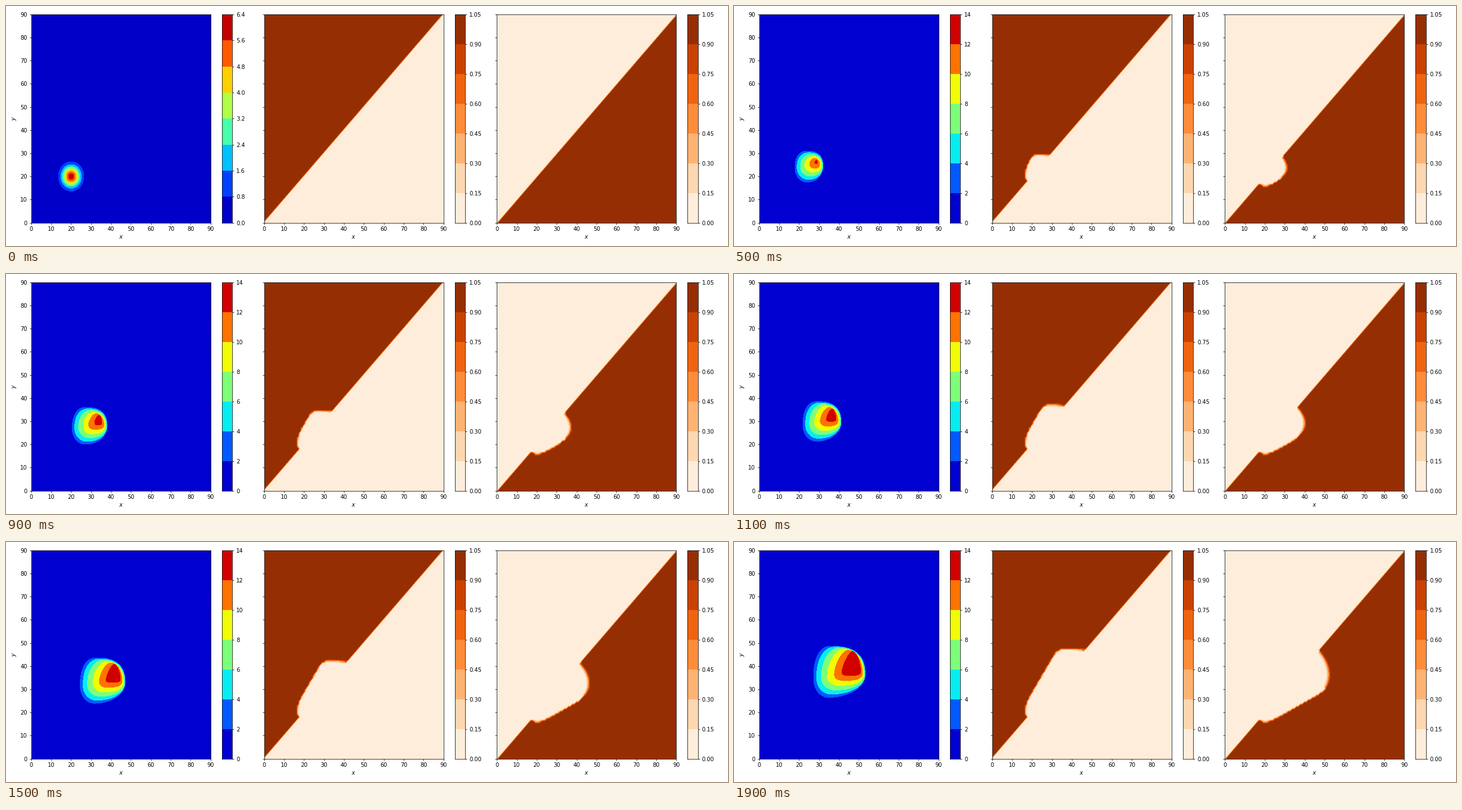
These frames come from a looping animation (1280x427 px, 2 s). A matplotlib script:

```python
import numpy as np
import matplotlib.pyplot as plt
from matplotlib.animation import FuncAnimation
from matplotlib.patches import Polygon

W, H, DPI = 1280, 427, 64
K = 10 / 9  # enlarges the default point sizes for this dpi
plt.rcParams.update({
    "font.family": "DejaVu Sans", "font.size": 10 * K,
    "axes.linewidth": 0.8 * K, "axes.labelpad": 4 * K,
    "xtick.major.size": 3.5 * K, "ytick.major.size": 3.5 * K,
    "xtick.major.width": 0.8 * K, "ytick.major.width": 0.8 * K,
    "xtick.major.pad": 3.5 * K, "ytick.major.pad": 3.5 * K,
})

LEFT, STEP_X, AX_W = 44.8, 412.75, 318
BASE, AX_H = 41.5, 370.5
FRAMES = 20
GROWN = 5  # frame from which the colony only travels and spreads

# Left, top, right and bottom tips (stage pixels) of the colony's rim and
# core when grown, and how far each tip travels per frame.
RIM = np.array([[108, 288], [130, 258], [157.7, 285], [130, 313.5]])
RIM_SPEED = np.array([[2.36, -3.2], [3.07, -5.2], [5.34, -3.5], [2.64, -2.64]])
CORE = np.array([[143.5, 277.5], [146, 274.5], [148, 278.5], [146, 281]])
CORE_SPEED = np.array([[3.4, -3.2], [4.57, -5.7], [5.46, -3.5], [4.14, -3.1]])
NESTING = np.array([[1.4], [1.1], [2.2], [1.2]])
# Quadrant exponents: 1 is an ellipse arc, 2 a straight cut.
RIM_ROUND = np.array([0.85, 0.8, 1, 1])
CORE_ROUND = np.array([1.4, 1.15, 0.65, 0.85])
TIPS = np.array([[-1, 0], [0, -1], [1, 0], [0, 1]])


def mix(a, b, k):
    return a + (b - a) * k


def contour(share, t):
    """Closed curve where density is the given share of its peak."""
    depth = np.clip((share - 0.16) / 0.82, 0, 1)
    age = max(t - GROWN, 0)
    tips = mix(RIM + RIM_SPEED * age, CORE + CORE_SPEED * age, depth ** NESTING)
    power = mix(RIM_ROUND, CORE_ROUND, depth ** 1.5)

    # The colony starts as a Gaussian and reshapes until grown.
    radius = np.sqrt(-20 * np.log(share)) / 90
    seed = [115.5, 303.2] + TIPS * radius * [AX_W, AX_H]
    growth = min(t / GROWN, 1)
    tips = mix(seed, tips, growth)
    power = mix(1, power, growth)

    a = np.linspace(0, np.pi / 2, 40)[:, None]
    c, s = np.clip(np.cos(a), 0, 1), np.sin(a)
    arcs = []
    for i in range(4):
        p, q = tips[i], tips[(i + 1) % 4]
        mid = np.array([q[0], p[1]] if i % 2 == 0 else [p[0], q[1]])
        arcs.append(mid + (p - mid) * c ** power[i] + (q - mid) * s ** power[i])
    x, y = np.vstack(arcs).T
    return np.column_stack([(x - LEFT) * 90 / AX_W, (H - BASE - y) * 90 / AX_H])


def density_levels(t):
    peak = 12.2 - 6.2 * max(1 - t / GROWN, 0) ** 1.7
    step = next(s for s in (0.8, 1, 1.5, 2) if 8 * s >= peak)
    return peak, step, int(np.ceil(peak / step))


X, Y = np.meshgrid(np.arange(91.0), np.arange(91.0))


def bank(v, low, start, slope):
    """Resting side of a cavity: a hook, a bend, then a straight slope."""
    rise = slope / 2 * (v - start + np.hypot(v - start, 2))
    return low + rise + 0.2 * np.maximum(20 - v, 0) ** 2


def remaining(tail, front, soft, t):
    """Share of food left, from the distances to both sides of the cavity."""
    r = 2.5
    corner = r - np.hypot(np.maximum(r - tail, 0), np.maximum(r - front, 0))
    d = np.where((tail < r) & (front < r), corner, np.minimum(tail, front))
    young = max(1 - t / 3, 0)
    width = np.where(front < tail, soft, 0.4) * (1 + young)
    return np.exp(-np.maximum((d - 1.2 * young) / width + 0.3, 0) ** 2)


def foods(t):
    first, second = (Y > X).astype(float), (X > Y).astype(float)
    if t == 0:
        return first, second
    u = t - 3
    top = 27.4 + 1.275 * u
    ceiling = top - 0.01 * np.maximum(X - top + 9, 0) ** 2
    side = bank(Y, 16.3, 23.9, 0.69)
    first *= remaining(0.83 * (X - side), ceiling - Y, 0.7, t)

    bend = 0.113 - 0.0041 * u
    wall = 28.6 + 1.525 * u - bend * (Y - 22 - 0.9 * u) ** 2
    floor = bank(X, 15.4, 22.3, 0.485)
    second *= remaining(0.9 * (Y - floor), wall - X, 1.1 + 0.03 * t, t)
    return first, second


fig = plt.figure(figsize=(W / DPI, H / DPI), dpi=DPI, facecolor="white")


def add_axes(x, w):
    return fig.add_axes([x / W, BASE / H, w / W, AX_H / H])


panels = [add_axes(LEFT + STEP_X * i, AX_W) for i in range(3)]
bars = [add_axes(LEFT + STEP_X * i + AX_W + 20.1, AX_H / 20) for i in range(3)]
for i, ax in enumerate(panels):
    ax.set(xlim=(0, 90), ylim=(0, 90), xlabel="$x$",
           xticks=range(0, 91, 10), yticks=range(0, 91, 10))
    if i:
        ax.tick_params(labelleft=False)
panels[0].set_ylabel("$y$")


def band_colors(name, n):
    return plt.get_cmap(name)((np.arange(n) + 0.5) / n)


def draw_bar(cax, step, colors, fmt):
    n = len(colors)
    cax.clear()
    cax.barh((np.arange(n) + 0.5) * step, 1, height=step, color=colors,
             linewidth=0, antialiased=False)
    ticks = np.arange(n + 1) * step
    cax.set(xlim=(0, 1), ylim=(0, n * step), xticks=[])
    cax.yaxis.tick_right()
    cax.set_yticks(ticks, [fmt % v for v in ticks])


SHARES = np.arange(8) * 0.15
ORANGES = band_colors("Oranges", 7)
for cax in bars[1:]:
    draw_bar(cax, 0.15, ORANGES, "%.2f")

drawn = []


def update(t):
    while drawn:
        drawn.pop().remove()
    peak, step, n = density_levels(t)
    colors = band_colors("jet", n)
    draw_bar(bars[0], step, colors, "%d" if step in (1, 2) else "%.1f")
    panels[0].set_facecolor(colors[0])
    for i in range(1, n):
        shape = Polygon(contour(i * step / peak, t), closed=True,
                        facecolor=colors[i], linewidth=0, antialiased=False)
        drawn.append(panels[0].add_patch(shape))
    for ax, field in zip(panels[1:], foods(t)):
        drawn.append(ax.contourf(X, Y, field, levels=SHARES, colors=ORANGES))
    return []


anim = FuncAnimation(fig, update, frames=FRAMES, init_func=lambda: update(0),
                     interval=100, repeat=True, repeat_delay=0, blit=False)
plt.show()
```
